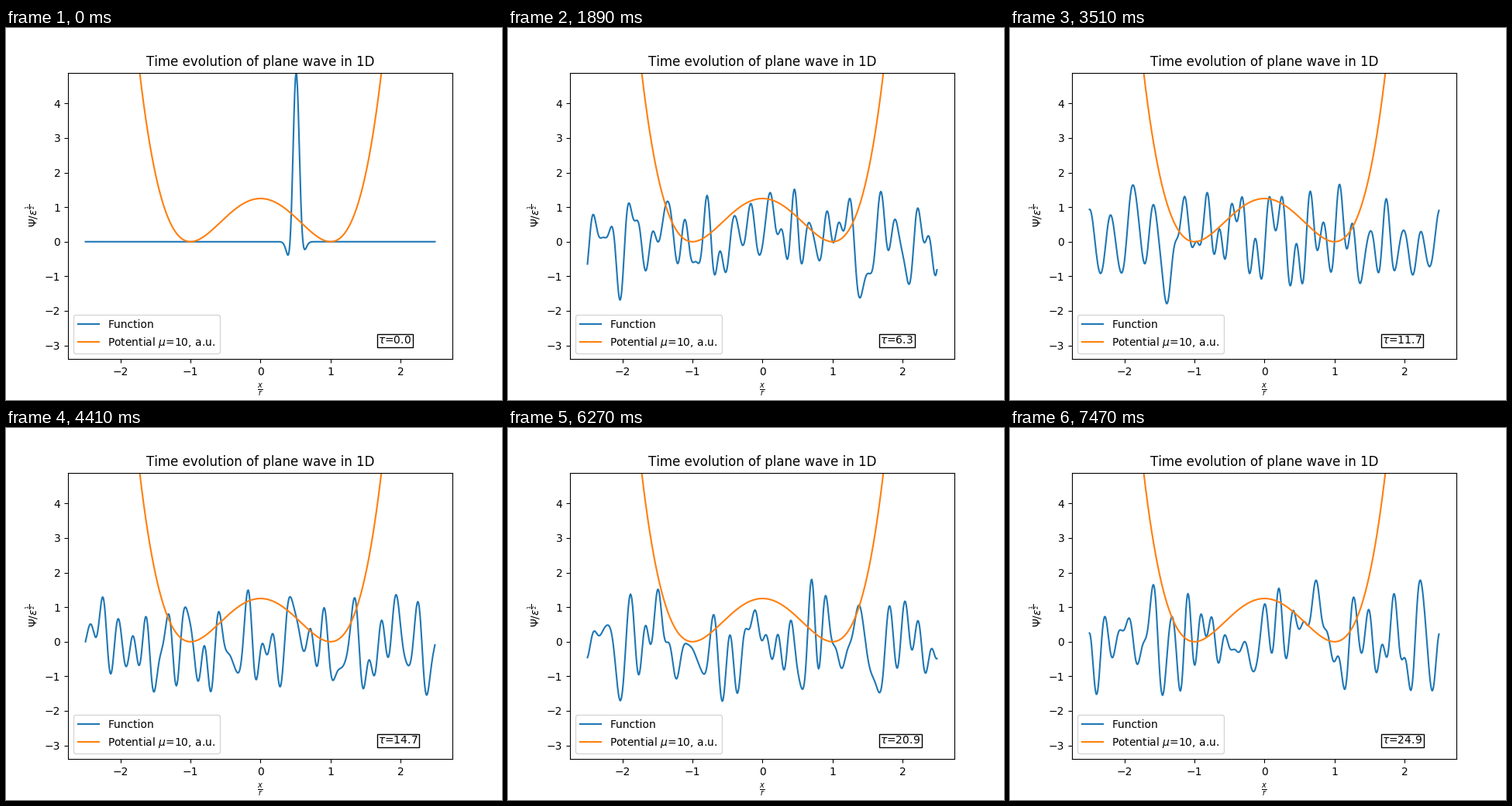
A matplotlib script that plays this animation: 640 by 480 pixels, repeating every 7.5 s.

```python
import numpy as np
import matplotlib.pyplot as plt
from matplotlib.animation import FuncAnimation

plt.rcParams["text.kerning_factor"] = 6  # whole-pixel kerning

FRAMES, INTERVAL = 250, 30
STEP, SUB = 0.1, 40           # time per frame, substeps per frame
N, L, MU = 512, 5.0, 10
Y_MIN, Y_MAX = -3.396, 4.892
X0, WIDTH, K0 = 0.505, 0.06, 17

x = -L / 2 + L * np.arange(N) / N
k = 2 * np.pi * np.fft.fftfreq(N, L / N)
potential = MU / 8 * (x**2 - 1)**2


def packet():
    """Narrow Gaussian packet whose real part peaks at the top of the axes."""
    phase = K0 * (x - X0 - 0.008)
    psi = np.exp(-((x - X0) / WIDTH)**2 / 2) * (np.cos(phase) + 2j * np.sin(phase))
    return psi * Y_MAX / psi.real.max()


def evolve(psi):
    """Real part at every frame, from split-step evolution on a ring."""
    dt = STEP / SUB
    half = np.exp(-0.5j * dt * potential)
    kinetic = np.exp(-0.5j * dt * k**2) * (np.abs(k) < 42)
    waves = [psi.real.copy()]
    while len(waves) < FRAMES:
        for _ in range(SUB):
            psi = half * np.fft.ifft(kinetic * np.fft.fft(half * psi))
        waves.append(psi.real.copy())
    return waves


def legend_spot(y):
    """First place along the bottom that the curve leaves free."""
    low = x[y < -2.11]
    spots = {"lower left": (-2.7, -0.566),
             "lower right": (0.577, 2.7),
             "lower center": (-1.053, 1.053)}
    for name, (a, b) in spots.items():
        if not np.any((low > a) & (low < b)):
            return name
    return "upper center"


waves = evolve(packet())

fig, ax = plt.subplots(figsize=(6.4, 4.8), dpi=100)
line, = ax.plot(x, waves[0], label="Function")
ax.plot(x, potential, label=rf"Potential $\mu$={MU}, a.u.")
ax.set_ylim(Y_MIN, Y_MAX)
ax.set_title("Time evolution of plane wave in 1D")
ax.set_xlabel(r"$\frac{x}{r}$")
ax.set_ylabel(r"$\Psi/\varepsilon^{\frac{1}{2}}$")
clock = ax.text(1.68, -2.95, "", bbox=dict(facecolor="white", pad=1))
legend = ax.legend(loc="lower left")


def update(n):
    line.set_ydata(waves[n])
    clock.set_text(rf"$\tau$={n * STEP:.1f}")
    legend.set_loc(legend_spot(waves[n]))
    return line, clock, legend


anim = FuncAnimation(fig, update, frames=FRAMES, interval=INTERVAL,
                     repeat=True, repeat_delay=0)
plt.show()
```
